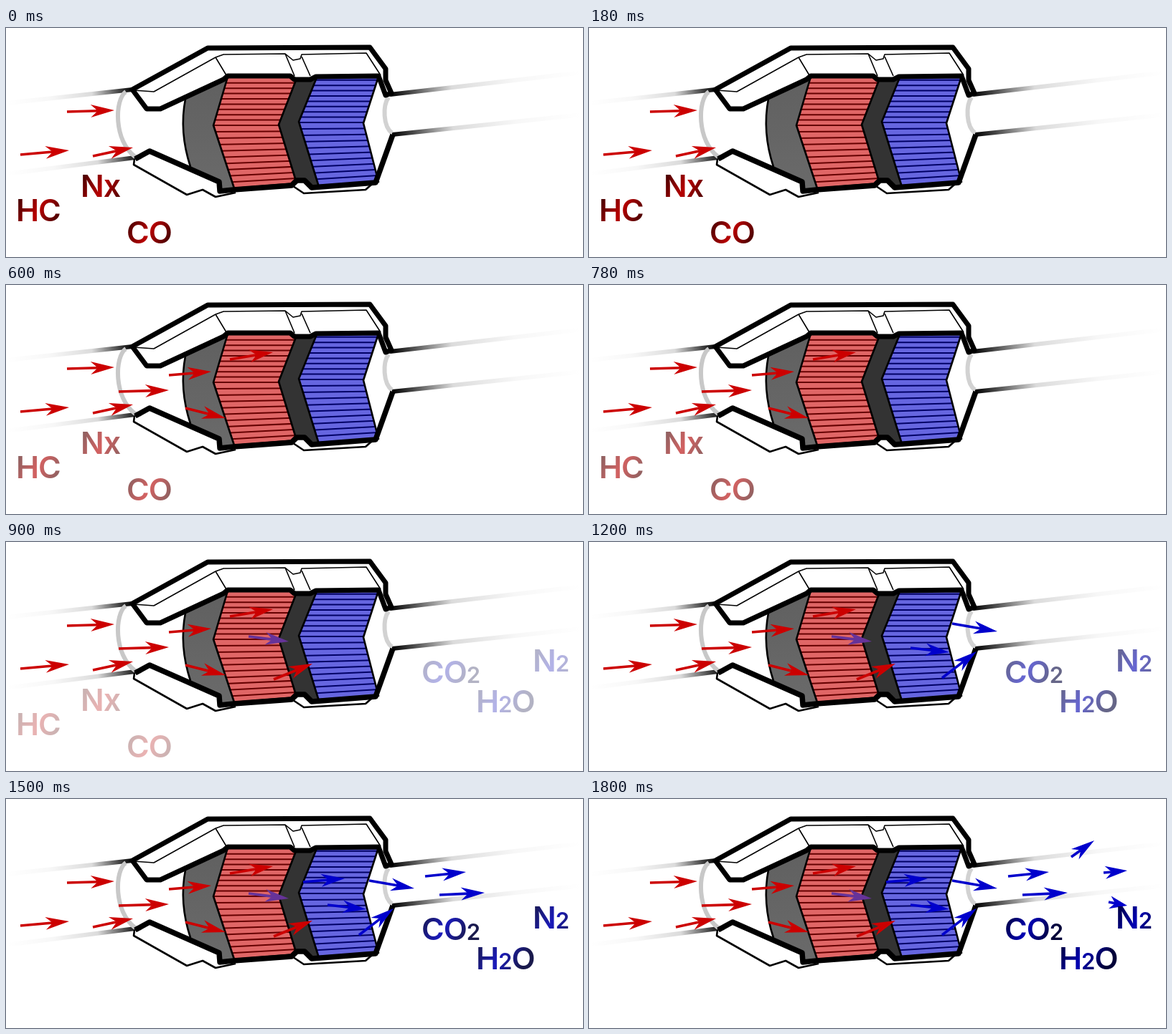
An HTML page with a canvas for the animation above (2.1 s loop, 804 by 320 pixels).

```html
<!DOCTYPE html>
<html lang="en">
<head>
<meta charset="utf-8">
<title>Catalytic converter</title>
<style>
html, body { margin: 0; width: 100%; height: 100%; overflow: hidden; background: #fff; }
canvas { display: block; }
</style>
</head>
<body>
<canvas id="stage" width="804" height="320"></canvas>
<script>
const ctx = document.getElementById('stage').getContext('2d');
const STEP = 300, STEPS = 7;
const RED = '#cc0000', BLUE = '#0000cc', PURPLE = '#663399';
const start = performance.now();

// Points are written as "x,y x,y ..."
const path = (pts, close) => new Path2D('M' + pts.replace(/ /g, 'L') + (close ? 'Z' : ''));

function stroke(p, width, color = '#000') {
  ctx.lineWidth = width;
  ctx.strokeStyle = color;
  ctx.stroke(p);
}

function fill(p, color) {
  ctx.fillStyle = color;
  ctx.fill(p);
}

const cover = path('176,86 281,28 507,27 529,57 529,73 537,91 529,94 519,67 432,68 424,72 402,72 396,67 309,67 303,72 215,113 196,113', true);
const roof = path('178,87 206,89 292,41 303,37 389,36 400,45 410,43 412,37 502,35 522,66');
const folds = ['292,41 307,66', '389,36 402,67', '412,40 424,67'].map(s => path(s));
const floor = path('180,183 200,172 297,215 298,228 317,226 398,220 405,213 416,213 426,223 515,216 539,149');
const under = ['179,183 178,191 252,233 274,226 292,236 320,230', '400,221 415,231 501,226 509,219'].map(s => path(s));
const chamber = new Path2D('M250,99L303,72L520,68L518,216L427,222L416,213L405,213L398,220L300,226L296,213L257,194Q241,145 250,99Z');
const mouth = new Path2D('M250,99Q241,145 257,194');

const bricks = [
  { shape: path('309,68 394,68 404,73 380,135 405,217 318,224 289,136', true),
    color: '#e06666', line: '#660000', left: 286, right: 410, mid: 136, tilt: 8 },
  { shape: path('433,69 519,68 498,133 519,215 436,222 408,131', true),
    color: '#6666e0', line: '#000066', left: 405, right: 523, mid: 132, tilt: 8 }
];

// step, x and y of tail, x and y of tip, colour
const arrows = [
  [0, 85, 117, 151, 115, RED], [0, 20, 177, 88, 171, RED], [0, 121, 179, 177, 167, RED],
  [1, 157, 149, 227, 147, RED], [1, 227, 126, 286, 121, RED],
  [2, 312, 104, 372, 94, RED], [2, 250, 172, 306, 186, RED],
  [3, 338, 132, 394, 139, PURPLE], [3, 373, 192, 427, 170, RED],
  [4, 506, 114, 569, 125, BLUE], [4, 448, 148, 502, 154, BLUE], [4, 492, 190, 540, 153, BLUE],
  [5, 414, 116, 472, 111, BLUE], [5, 584, 108, 641, 102, BLUE], [5, 604, 134, 667, 131, BLUE],
  [6, 672, 81, 704, 58, BLUE], [6, 717, 103, 750, 100, BLUE], [6, 724, 144, 750, 149, BLUE]
];

const gasIn = [['HC', 14, 270], ['Nx', 104, 236], ['CO', 168, 301]];
const gasOut = [['CO2', 579, 197], ['H2O', 655, 238], ['N2', 734, 181]];
const fadeIn = [0, 0, 0, 0.3, 0.6, 0.9, 1];
const fadeOut = [1, 0.9, 0.62, 0.3, 0, 0, 0];

function pipe(x1, y1, x2, y2) {
  const g = ctx.createLinearGradient(x1, y1, x2, y2);
  g.addColorStop(0, 'rgba(0,0,0,1)');
  g.addColorStop(0.1, 'rgba(0,0,0,0.75)');
  g.addColorStop(0.32, 'rgba(0,0,0,0.14)');
  g.addColorStop(0.65, 'rgba(0,0,0,0.03)');
  g.addColorStop(1, 'rgba(0,0,0,0)');
  stroke(path(`${x1},${y1} ${x2},${y2}`), 6, g);
}

function brick(b) {
  fill(b.shape, b.color);
  ctx.save();
  ctx.clip(b.shape);
  for (let i = -8; i <= 10; i++) {
    const y = b.mid + i * (i < 0 ? 7.4 : 8.6);
    const lean = i > 0 ? b.tilt * i / 10 : 0;
    stroke(path(`${b.left},${y + lean / 2} ${b.right},${y - lean / 2}`), 2, b.line);
  }
  ctx.restore();
  stroke(b.shape, 2.6);
}

function arrow(x1, y1, x2, y2, color) {
  const len = Math.hypot(x2 - x1, y2 - y1);
  const head = Math.min(33, len * 0.93), notch = head * 0.7;
  ctx.save();
  ctx.translate(x2, y2);
  ctx.rotate(Math.atan2(y2 - y1, x2 - x1));
  stroke(path(`${-len},0 ${-notch},0`), 3.6, color);
  fill(path(`0,0 ${-head},-9 ${-notch},0 ${-head},9`, true), color);
  ctx.restore();
}

function label([text, x, y], dark, bright) {
  const g = ctx.createLinearGradient(x, y - 32, x + 62, y);
  g.addColorStop(0, dark);
  g.addColorStop(0.5, bright);
  g.addColorStop(1, dark);
  ctx.fillStyle = g;
  for (const ch of text) {
    ctx.font = `600 ${ch === '2' ? 31 : 43}px Inter, "Liberation Sans", sans-serif`;
    ctx.fillText(ch, x, y);
    x += ctx.measureText(ch).width - 1;
  }
}

function labels(list, alpha, dark, bright) {
  ctx.globalAlpha = alpha;
  list.forEach(item => label(item, dark, bright));
  ctx.globalAlpha = 1;
}

function converter() {
  pipe(176, 86, 0, 105);
  pipe(188, 180, 0, 204);
  pipe(535, 93, 804, 62);
  pipe(538, 149, 804, 121);
  stroke(new Path2D('M167,89C151,100 150,158 180,180'), 6, '#c8c8c8');
  stroke(new Path2D('M533,97C525,108 525,137 538,147'), 6, '#d2d2d2');
  const shade = ctx.createLinearGradient(0, 70, 0, 225);
  shade.addColorStop(0, '#606060');
  shade.addColorStop(1, '#6a6a6a');
  ctx.save();
  ctx.clip(chamber);
  ctx.fillStyle = shade;
  ctx.fillRect(240, 60, 110, 175);
  fill(path('394,68 436,68 408,131 436,224 398,224 405,217 380,135 404,73', true), '#333');
  fill(path('519,68 545,68 545,220 519,216 498,133', true), '#fff');
  ctx.restore();
  stroke(mouth, 2.6);
  bricks.forEach(brick);
  fill(cover, '#fff');
  stroke(roof, 1.6);
  folds.forEach(f => stroke(f, 1.6));
  stroke(cover, 7);
  under.forEach(u => stroke(u, 2.6));
  stroke(floor, 7.5);
}

function draw() {
  const step = Math.floor((performance.now() - start) / STEP) % STEPS;
  ctx.fillStyle = '#fff';
  ctx.fillRect(0, 0, 804, 320);
  ctx.lineJoin = 'round';
  converter();
  for (const [from, ...a] of arrows) if (step >= from) arrow(...a);
  labels(gasIn, fadeOut[step], '#3a0000', '#b80000');
  labels(gasOut, fadeIn[step], '#000038', '#0000b4');
  requestAnimationFrame(draw);
}
draw();
</script>
</body>
</html>
```
